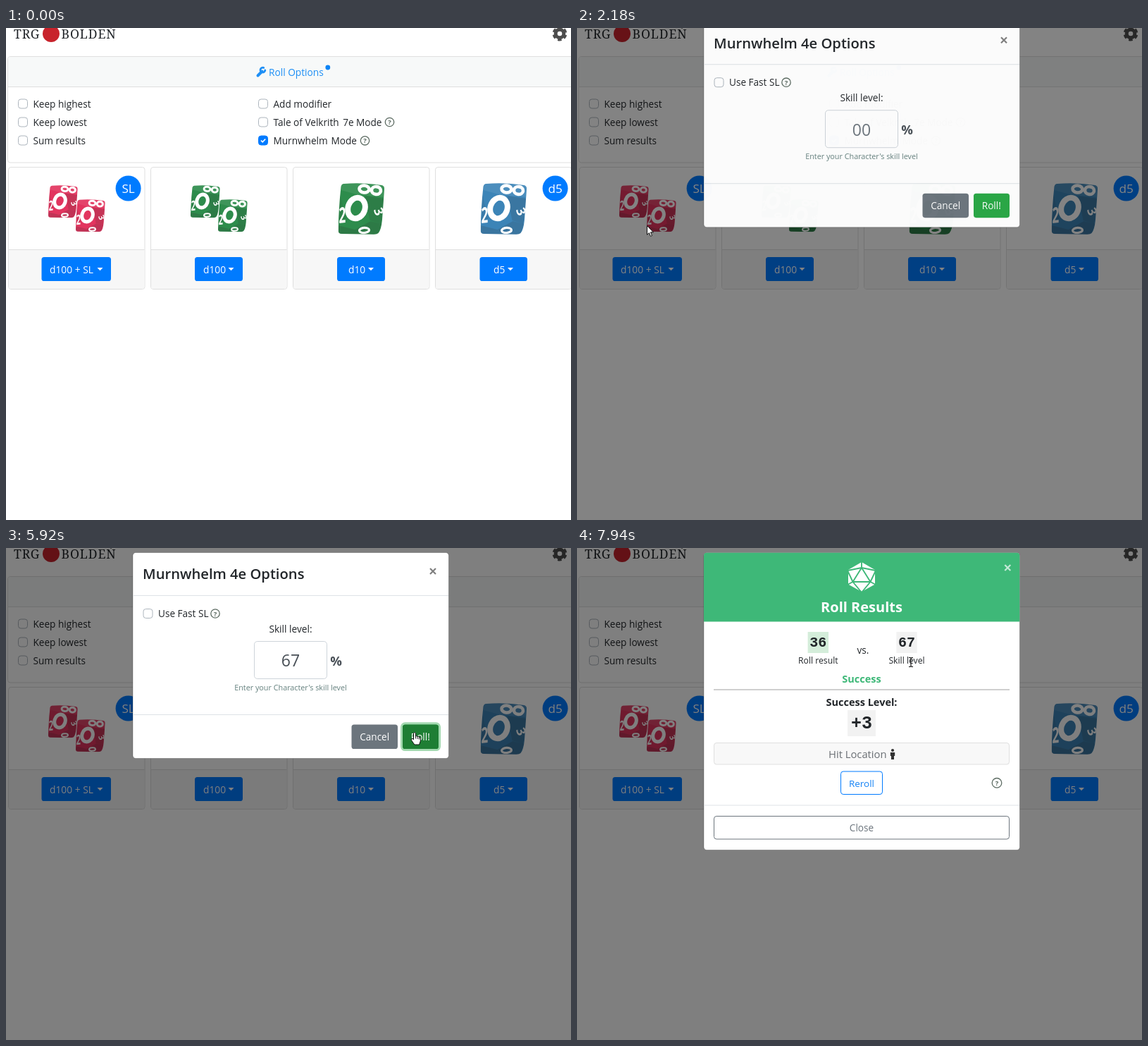
An HTML page for the animation above (8 s loop, 802 by 698 pixels).

```html
<!DOCTYPE html>
<html lang="en">
<head>
<meta charset="utf-8">
<title>Dice roller</title>
<style>
html, body { margin: 0; width: 100%; height: 100%; overflow: hidden; background: #fff; }
svg { display: block; width: 802px; height: 698px; }
text { font-family: "Open Sans", "Noto Sans", sans-serif; fill: #212529; white-space: pre; }
.mono { font-family: "Liberation Mono", "DejaVu Sans Mono", monospace; }
.serif { font-family: "Noto Serif", serif; }
</style>
</head>
<body>
<svg id="stage" viewBox="0 0 802 698" xmlns="http://www.w3.org/2000/svg"></svg>
<script>
const LOOP = 8000, STEP = 75;
const BLUE = '#007bff', GREEN = '#3eb878', GREY = '#6c757d';

// ---- drawing helpers ----
const text = (x, y, s, size = 13.6, o = {}) =>
  `<text x="${x}" y="${y}" font-size="${size}" text-anchor="${o.at || 'start'}" font-weight="${o.w || 400}"` +
  ` class="${o.cls || ''}" letter-spacing="${o.gap || 0}" style="fill:${o.fill || '#212529'}">${s}</text>`;
const mid = (x, y, s, size, o = {}) => text(x, y, s, size, { ...o, at: 'middle' });
const box = (x, y, w, h, fill, stroke = 'none', r = 3.6, extra = '') =>
  `<rect x="${x}" y="${y}" width="${w}" height="${h}" rx="${r}" fill="${fill}" stroke="${stroke}" ${extra}/>`;
const line = (x1, y, x2, color = '#dee2e6') =>
  `<path d="M${x1} ${y}H${x2}" stroke="${color}"/>`;
const help = (x, y, r = 6.2) =>
  `<circle cx="${x}" cy="${y}" r="${r}" fill="none" stroke="#5c6b62" stroke-width="1.3"/>` +
  mid(x, y + 3.5, '?', 9.6, { w: 700, fill: '#5c6b62' });
const cross = (x, y, color) =>
  `<path d="M${x - 4} ${y - 4}l8 8m0 -8l-8 8" stroke="${color}" stroke-width="2.2"/>`;

function check(x, y, label, on) {
  return box(x - 6.5, y - 6.5, 13, 13, on ? BLUE : '#fff', on ? BLUE : '#adb5bd') +
    (on ? `<path d="M${x - 3} ${y}l2.2 2.3l4 -4.3" fill="none" stroke="#fff" stroke-width="1.8"/>` : '') +
    text(x + 14.5, y + 5.2, label);
}

function die(x, y, k, color) {
  const ring = (cx, cy, rx, ry, w, turn) =>
    `<ellipse cx="${cx}" cy="${cy}" rx="${rx}" ry="${ry}" stroke-width="${w}" transform="rotate(${turn} ${cx} ${cy})" fill="none" stroke="#fff"/>`;
  const white = 'style="fill:#fff" font-weight="700"';
  return `<g transform="translate(${x} ${y}) scale(${k})" clip-path="url(#dieShape)">
    <rect width="67" height="74" fill="${color}"/>
    <path d="M5 0H66L64 20L30 17L4 10Z" fill="#fff" opacity=".08"/>
    <path d="M38 18L65 22L61 58L45 53Z" fill="#000" opacity=".16"/>
    <path d="M2 14L11 50L1 58Z" fill="#000" opacity=".1"/>
    <path d="M0 60L24 66L46 54L62 58L56 74H0Z" fill="#000" opacity=".18"/>
    ${ring(26, 35.5, 12, 15, 8, 18)}
    ${ring(37, 8.5, 7, 5, 4.6, 6)}${ring(54, 10.5, 6.5, 5.4, 4.6, 6)}
    <text ${white} font-size="31" transform="translate(1 57) skewY(-6) scale(.55 1)">2</text>
    <text ${white} font-size="18" transform="translate(50 38) rotate(68)">3</text>
    ${ring(37, 67, 7, 3.6, 3.2, -4)}
  </g>`;
}

function card(x, label, bx, bw, tx, cx, dice, badge) {
  return box(x + .5, 197.5, 193.5, 173, '#fff', '#dfdfdf') +
    `<path d="M${x + 1} 314H${x + 193.5}V367q0 3 -3 3H${x + 4}q-3 0 -3 -3Z" fill="#f7f7f7"/>` +
    line(x + 1, 314.5, x + 193.5, '#dfdfdf') + dice +
    (badge ? `<circle cx="${x + 170.6}" cy="227.5" r="18" fill="${BLUE}"/>` +
      mid(x + 170.6, 234.3, badge, 17.2, { fill: '#fff' }) : '') +
    box(bx, 325, bw, 34, BLUE) + text(tx, 348, label, 13.8, { fill: '#fff' }) +
    `<path d="M${cx} 340h8l-4 4.3Z" fill="#fff"/>`;
}

const pair = (x, color, id) =>
  `<g id="${id}" opacity=".82">${die(x, 223, .635, color)}${die(x + 39, 243, .635, color)}</g>`;
const single = (x, color) => `<g opacity=".82">${die(x, 220, 1, color)}</g>`;

function page() {
  return text(11, 15, 'TRG', 17.6, { cls: 'serif', gap: .9 }) +
    '<circle cx="64" cy="8" r="12" fill="#c8232c"/>' +
    text(78.5, 15, 'BOLDEŃ', 17.6, { cls: 'serif', gap: .9 }) +
    `<g fill="none" stroke="#4d4d4d"><circle cx="786" cy="8" r="5.8" stroke-width="5"/>
      <circle cx="786" cy="8" r="8.8" stroke-width="3.2" stroke-dasharray="5.4 3.815" stroke-dashoffset="7.3"/></g>` +
    box(2.5, 40.5, 803, 150.5, '#fff', '#dfdfdf') +
    '<path d="M3 44q0 -3 3 -3H802V83H3Z" fill="#f7f9f9"/>' + line(3, 83.5, 802, '#dfdfdf') +
    `<g fill="none" stroke="#1e8ff5" stroke-linecap="round">
      <path d="M357.5 67.5L363.5 61.5" stroke-width="4"/>
      <path d="M365.7 56.4A3.4 3.4 0 1 0 367.8 60" stroke-width="2.8"/></g>` +
    text(373, 67.5, 'Roll Options', 13.7, { fill: '#1e8ff5' }) +
    '<circle cx="456.8" cy="56" r="3.4" fill="#0d84f5"/>' +
    check(24, 107.5, 'Keep highest') + check(24, 133.5, 'Keep lowest') + check(24, 159.5, 'Sum results') +
    check(365, 107.5, 'Add modifier') + check(365, 133.5, 'Tale of Velkrith') + check(365, 159.5, 'Murnwhelm', true) +
    text(533.5, 138.7, '7e Mode', 13.6, { at: 'end' }) + help(544.5, 133.5) +
    text(498, 164.7, 'Mode', 13.6, { at: 'end' }) + help(509.5, 159.8) +
    card(3, 'd100 + SL', 50.5, 98.5, 62, 129.5, pair(60, '#dc093c', 'redDice'), 'SL') +
    card(205, 'd100', 268, 68, 280, 315.5, pair(262, '#007325', 'greenDice')) +
    card(407, 'd10', 470, 68, 486, 514, single(471.5, '#007325')) +
    card(609, 'd5', 672.5, 67.5, 692, 712, single(673.5, '#126aa8'), 'd5');
}

function optionsModal() {
  return box(180, 6.5, 448.5, 292, '#fff', 'rgba(0,0,0,.25)', 4.3) +
    text(194, 44.3, 'Murnwhelm 4e Options', 20.2, { w: 600 }) + cross(606, 33, '#7f7f7f') +
    line(180.5, 67.5, 628) + check(201.5, 93, 'Use Fast SL') + help(297, 93) +
    mid(404, 119.6, 'Skill level:', 13.7) +
    box(350.5, 131, 106.5, 56.5, 'none', '#bfdeff', 5.5, 'id="inputRing" stroke-width="3"') +
    box(352.5, 132.5, 103, 53, '#fff', '#ced4da', 4.3) +
    box(352.5, 132.5, 103, 53, 'none', '#80bdff', 4.3, 'id="inputEdge"') +
    `<text id="field" x="404" y="168.3" font-size="23" text-anchor="middle"></text>` +
    '<rect id="caret" y="143" width="1" height="31" fill="#222"/>' +
    text(460.3, 167, '%', 18.5, { w: 700, fill: '#495057' }) +
    mid(404, 202.2, "Enter your Character's skill level", 10.8, { fill: '#64807e' }) +
    line(180.5, 236.5, 628) +
    box(490.5, 250.5, 65.5, 34.5, GREY) + mid(523.2, 273, 'Cancel', 13.6, { fill: '#fff' }) +
    box(561.5, 248.8, 54, 37.8, 'none', '#a3d9b0', 5, 'id="rollRing" stroke-width="3"') +
    box(563, 250.5, 51, 34.5, '#28a745') + box(563, 250.5, 51, 34.5, '#1e7e34', 'none', 3.6, 'id="rollDark"') +
    mid(588.3, 273, 'Roll!', 13.6, { fill: '#fff' });
}

function resultModal() {
  const white = { fill: '#fff', w: 700 };
  const num = (x, n, fill) => box(x - 14.7, 119, 29.4, 30, fill, 'none', 0) +
    mid(x, 139.7, n, 20, { cls: 'mono', w: 700 });
  return box(180, 6.5, 448.5, 422, '#fff', 'rgba(0,0,0,.25)', 4.3) +
    `<path d="M180 104.5V11q0 -4.3 4.3 -4.3H624q4.3 0 4.3 4.3V104.5Z" fill="${GREEN}"/>` +
    '<path d="M404 20L423 31V51.5L404 62L385 51.5V31Z" fill="#fff"/>' +
    `<path d="M404 28L391.5 48H416.5ZM404 19V28L384 32L391.5 48L384 52M404 28L424 32L416.5 48L424 52M391.5 48L404 63L416.5 48"
      fill="none" stroke="${GREEN}" stroke-width="1.9" stroke-linejoin="round"/>` +
    cross(611.3, 28, '#c5e9d7') + mid(404, 91, 'Roll Results', 20, white) +
    num(342.3, '36', '#d4edda') + num(468, '67', '#f2f2f2') +
    mid(342.3, 164, 'Roll result', 12.2) + mid(468, 164, 'Skill level', 12.2) + mid(406, 150, 'vs.') +
    mid(404, 191, 'Success', 14.5, { w: 700, fill: GREEN }) +
    box(194, 200, 420, 2, '#cfcfcf', 'none', 0) +
    mid(404, 224, 'Success Level:', 14.5, { w: 700 }) +
    box(384, 230, 40, 37, '#f2f2f2', 'none', 0) + mid(404, 255.5, '+3', 25, { cls: 'mono', w: 700 }) +
    box(194.5, 276.5, 419, 30.5, '#f8f8f8', '#dfdfdf') +
    text(357, 297.7, 'Hit Location', 14.8, { fill: '#6a6f74' }) +
    '<circle cx="448" cy="287" r="2.1" fill="#333"/><path d="M444.8 290h6.4v5h-1.2v5h-4v-5h-1.2Z" fill="#333"/>' +
    box(374.5, 317, 59, 32.5, '#fff', BLUE) + mid(404, 339, 'Reroll', 13.4, { fill: '#1683f5' }) +
    help(596, 333.3, 6.8) + line(180.5, 365, 628) +
    box(194.5, 380.5, 419, 32.5, '#fff', GREY) + mid(404, 402, 'Close', 13.6, { fill: GREY });
}

const pointers = `<g id="arrow"><path d="M.5 .5V13.2L3.4 10.6L5.4 15.4L7.5 14.5L5.5 9.8H9.4Z" fill="#fff" stroke="#111"/></g>
  <g id="beam"><path d="M-3 -6.5H-1L0 -5.8L1 -6.5H3M0 -6V6M-3 6.5H-1L0 5.8L1 6.5H3" fill="none" stroke="#111" stroke-width="1.2"/></g>
  <g id="hand"><path d="M-.5 11V1.8Q1 -.6 2.5 1.8V6Q4 5 5 6.6Q6.5 5.6 7.3 7.4Q9 6.8 9.3 9V13L7.6 18H.8L-3.6 11.6Q-4 9 -2 9.4Z"
    fill="#fff" stroke="#111" stroke-linejoin="round"/><path d="M2.5 6V9.5M5 7V10M7.3 8V10.5" stroke="#111" stroke-width=".9"/></g>`;

const stage = document.getElementById('stage');
stage.innerHTML = `<defs><clipPath id="dieShape">
    <path d="M8 1Q36 -1 62 3Q66 4 65.5 9L62.5 52Q61 67 57 71Q55 73 50 72.8L5 72Q0 72 0 67Q1 32 4 5Q5 1 8 1Z"/></clipPath></defs>
  ${page()}<rect id="shade" width="802" height="698"/>
  <g id="options">${optionsModal()}</g><g id="results">${resultModal()}</g><g id="cursor">${pointers}</g>`;

// ---- motion ----
const el = {};
stage.querySelectorAll('[id]').forEach(n => el[n.id] = n);

const path = [
  [300, 737, 690], [600, 430, 370], [825, 190, 192], [975, 135, 225], [1075, 122, 255],
  [1150, 133, 280], [1300, 93, 270], [1775, 93, 270], [1850, 99, 272], [1950, 99, 272], [2025, 99, 280],
  [2650, 99, 280], [2800, 130, 272], [3125, 350, 190], [3350, 398, 170],
  [4900, 398, 170], [5125, 430, 195], [5400, 560, 250], [5600, 579, 261],
  [6700, 579, 261], [7000, 480, 220], [7300, 370, 165], [7475, 349, 154],
  [7575, 349, 154], [7800, 430, 163], [7950, 474, 162]
];

const ramp = (t, from, len) => Math.min(1, Math.max(0, (t - from) / len));
const easeOut = p => 1 - Math.pow(1 - p, 1.7);
const within = (t, a, b) => t >= a && t < b;
const fade = (node, v) => node.setAttribute('opacity', v);
const show = (node, on) => node.setAttribute('display', on ? 'inline' : 'none');
const shift = (node, x, y) => node.setAttribute('transform', `translate(${x} ${y})`);

function spot(t) {
  const i = path.findIndex(p => p[0] > t);
  if (i < 0) return path[path.length - 1].slice(1);
  if (i === 0) return path[0].slice(1);
  const [t0, x0, y0] = path[i - 1], [t1, x1, y1] = path[i];
  const p = (t - t0) / (t1 - t0);
  return [x0 + (x1 - x0) * p, y0 + (y1 - y0) * p];
}

function drawCursor(t) {
  const kind = within(t, 1050, 2000) || within(t, 5450, 6060) ? 'hand'
    : within(t, 3200, 5050) || t >= 7300 ? 'beam' : 'arrow';
  for (const k of ['hand', 'beam', 'arrow']) show(el[k], k === kind);
  show(el.cursor, t >= 300 && !within(t, 4350, 4975));
  shift(el.cursor, ...spot(t));
}

function drawField(t) {
  const typed = t < 4350 ? '' : t < 4650 ? '6' : '67';
  el.field.textContent = typed || '00';
  el.field.style.fill = typed ? '#495057' : GREY;
  el.caret.setAttribute('x', 404 + typed.length * 6.5);
  show(el.caret, within(t, 3425, 3960) || within(t, 4350, 5210));
  const focus = ramp(t, 3375, 200) - ramp(t, 5725, 200);
  fade(el.inputRing, focus);
  fade(el.inputEdge, focus);
}

function draw(time) {
  const t = Math.floor((time + 10) / STEP) * STEP;
  fade(el.redDice, .82 + .18 * (ramp(t, 1000, 300) - ramp(t, 2030, 150)));

  const open = ramp(t, 2037, 142), gone = ramp(t, 5980, 150);
  fade(el.shade, open * .5);
  fade(el.options, open * (1 - gone));
  shift(el.options, 0, -45 * (1 - easeOut(ramp(t, 2037, 300)) + easeOut(ramp(t, 5980, 300))));
  fade(el.rollDark, ramp(t, 5425, 150));
  fade(el.rollRing, ramp(t, 5725, 200));

  fade(el.results, ramp(t, 6000, 150));
  shift(el.results, 0, -45 * (1 - easeOut(ramp(t, 6000, 300))));
  drawField(t);
  drawCursor(t);
}

function tick() {
  draw(performance.now() % LOOP);
  requestAnimationFrame(tick);
}
tick();
</script>
</body>
</html>
```
